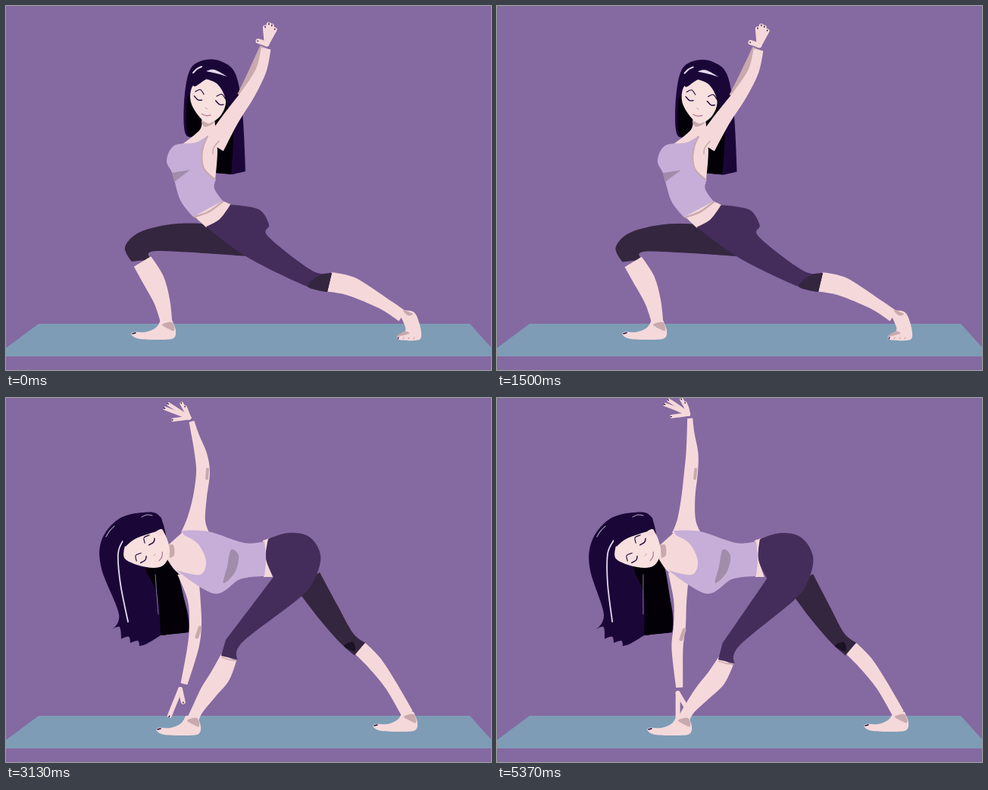
Write an HTML page that moves like this. It is 640 by 480 pixels and loops after 5.41 s.

```html
<!DOCTYPE html>
<html lang="en">
<head>
<meta charset="utf-8">
<title>Yoga flow</title>
<style>
html, body { margin: 0; width: 100%; height: 100%; overflow: hidden; background: #8569a1; }
svg { display: block; width: 640px; height: 480px; }
</style>
</head>
<body>
<svg viewBox="0 0 640 480">
  <rect width="640" height="480" fill="#8569a1"/>
  <path d="M43 419H612L640 450V462H0V451Z" fill="#7e9cb6"/>
  <g id="lunge"></g>
  <g id="triangle"></g>
</svg>
<script>
const LOOP = 5410, SWITCH = 2500;
const SKIN = '#f5d9da', FACE = '#f8e0df', SHADE = '#c8a9ad', TOP = '#c6aed8', FOLD = '#a18caa',
  PANTS = '#442d5a', DARK = '#34263f', HAIR = '#1b0638', BLACK = '#030007', GLOSS = '#e4daf0';
const poses = {
  lunge: { el: document.getElementById('lunge'), parts: [] },
  triangle: { el: document.getElementById('triangle'), parts: [] }
};
let pose;

const clamp = v => Math.max(0, Math.min(1, v));
function ease(t, start, end) {
  const u = clamp((t - start) / (end - start));
  return u * u * (3 - 2 * u);
}

// Motion rules: an offset that grows with height from y0 to y1, and sums of such offsets.
const still = () => [0, 0];
const shift = (dx, dy) => () => [dx, dy];
const pull = (dx, dy, y0, y1) => y => {
  const w = clamp((y - y0) / (y1 - y0));
  return [dx * w, dy * w];
};
const both = (a, b) => y => a(y).map((v, i) => v + b(y)[i]);

// Points are "x,y" or "x,y,halfWidth"; a trailing * marks a sharp corner.
const parse = text => text.trim().split(/\s+/).map(s => {
  const [x, y, w] = s.replace('*', '').split(',').map(Number);
  return { x, y, w, sharp: s.endsWith('*') };
});

function curve(pts, closed) {
  const n = pts.length;
  const at = i => closed ? pts[(i + n) % n] : pts[Math.max(0, Math.min(n - 1, i))];
  const tangent = i => at(i).sharp ? [0, 0]
    : [(at(i + 1).x - at(i - 1).x) / 6, (at(i + 1).y - at(i - 1).y) / 6];
  let d = `M${pts[0].x} ${pts[0].y}`;
  for (let i = 0; i < (closed ? n : n - 1); i++) {
    const p = at(i), q = at(i + 1), s = tangent(i), e = tangent(i + 1);
    d += `C${[p.x + s[0], p.y + s[1], q.x - e[0], q.y - e[1], q.x, q.y].map(v => v.toFixed(2)).join(' ')}`;
  }
  return d + (closed ? 'Z' : '');
}

// Outline of a tapered limb around its joints.
function outline(joints) {
  const sides = [[], []], last = joints.length - 1;
  joints.forEach((p, i) => {
    const a = joints[Math.max(0, i - 1)], b = joints[Math.min(last, i + 1)];
    const length = Math.hypot(b.x - a.x, b.y - a.y);
    const nx = (a.y - b.y) / length * p.w, ny = (b.x - a.x) / length * p.w;
    const sharp = i === 0 || i === last;
    sides[0].push({ x: p.x + nx, y: p.y + ny, sharp });
    sides[1].unshift({ x: p.x - nx, y: p.y - ny, sharp });
  });
  return curve(sides.flat(), true);
}

function add(shape, move, color, points, width) {
  const el = document.createElementNS('http://www.w3.org/2000/svg', 'path');
  el.setAttribute('fill', width ? 'none' : color);
  if (width) {
    el.setAttribute('stroke', color);
    el.setAttribute('stroke-width', width);
    el.setAttribute('stroke-linecap', 'round');
  }
  pose.el.append(el);
  pose.parts.push({ el, shape, move, points });
}
const blob = (move, color, text) => add(p => curve(p, true), move, color, parse(text));
const limb = (move, color, text) => add(outline, move, color, parse(text));
const line = (move, color, text, width) => add(p => curve(p, false), move, color, parse(text), width);

// Fingers run from the palm to each tip and end in a dark nail.
function hand(move, palm, tips, width) {
  const [cx, cy] = palm;
  for (const [x, y] of tips) {
    const along = u => `${x + (cx - x) * u},${y + (cy - y) * u}`;
    line(move, SKIN, `${along(.06)} ${along(.5)} ${cx},${cy}`, width);
    line(move, HAIR, `${along(0)} ${along(.05)}`, 1.3);
  }
}
function foot(x, y) {
  const place = text => parse(text).map(p => `${p.x + x},${p.y + y}${p.sharp ? '*' : ''}`).join(' ');
  blob(still, SKIN, place('-20,-25* -26,-15 -40,-9 -56,-9 -58,-5 -48,0 -20,1 -3,-1 0,-11 -5,-25*'));
  blob(still, SHADE, place('-18,-19 -5,-22 -2,-11 -9,-13'));
  line(still, HAIR, place('-57,-7 -53,-8'), 1.5);
}
// Closed eyes, brows, nose and mouth, turned as one around the point between the eyes.
function features(move, x, y, degrees, spread) {
  const c = Math.cos(degrees * Math.PI / 180), s = Math.sin(degrees * Math.PI / 180);
  const place = (text, ox = 0) => parse(text)
    .map(p => [p.x + ox, p.y]).map(([u, v]) => `${x + u * c - v * s},${y + u * s + v * c}`).join(' ');
  for (const ox of [-spread, spread]) {
    line(move, HAIR, place('-6,-2 0,2 5,1', ox), 1.4);
    line(move, HAIR, place('-6,-8 0,-12 6,-7', ox), 1.1);
  }
  line(move, '#b98d9d', place('-3,10 0,11'), .9);
  line(move, '#b46f91', place('-6,19 0,20 6,18'), 1.2);
}

function buildLunge() {
  pose = poses.lunge;
  const head = shift(2, 2), arm = pull(6.5, 6, 190, 65), body = pull(-1, 2, 165, 260);
  const frontLeg = pull(-1.6, 1.9, 415, 300), hips = pull(-1.4, 2, 345, 290);

  blob(head, HAIR, '263,71 244,82 236,115 235,160 243,173 266,164 276,220* 299,222* 316,218* 312,140 303,90 284,73');
  blob(head, BLACK, '288,120 300,150 297,222* 276,220* 264,160');
  blob(head, BLACK, '241,118 239,165 251,171 258,150');
  limb(arm, SHADE, '340,54,5 327,85,6 309,118,4');
  blob(body, SKIN, '258,148* 256,163 233,182* 240,205 276,230* 279,190 275,149*');
  blob(body, SHADE, '258,151 268,155 276,149 272,156 262,159');
  limb(arm, SKIN, '343,56,6.5 337,84,7 320,115,9 297,148,11 275,184,14');
  hand(arm, [344, 50], [[342, 27], [347, 23], [351, 25], [355, 30], [332, 46]], 6.5);
  line(arm, SHADE, '281,178 274,187 273,195', 1.5);

  blob(frontLeg, DARK, '280,288* 225,287 177,298 157,318 166,337* 193,334* 199,323 320,330*');
  limb(frontLeg, SKIN, '180,337,13 195,362,14 206,390,10.5 212,418,7.5');
  foot(224, 439);
  limb(hips, SKIN, '427,364,13 456,370,12.5 496,391,8.5 523,409,8');
  blob(still, SKIN, '517,402* 537,403 545,417 548,436 540,441 516,439 527,428 524,416');
  blob(still, SHADE, '524,401 537,406 530,408');
  blob(still, SHADE, '515,436 526,429 532,432');
  for (let x = 517; x < 545; x += 7) line(still, x < 520 ? HAIR : SHADE, `${x},439 ${x + 1},437`, 1.1);
  blob(body, SKIN, '247,276* 284,256* 297,262* 284,282 264,292*');
  blob(hips, PANTS, '264,291* 282,281 296,262* 333,268 347,288 346,304 404,349 430,352* 424,377* 395,369 318,331');
  blob(hips, DARK, '398,370 414,355 430,352* 424,377*');

  blob(body, TOP, '266,171* 250,180 222,184 212,204 220,222 230,256 247,278* 286,257* 275,241 277,229* 259,210 261,187');
  line(body, SHADE, '266,172 259,190 261,214 276,229', 2);
  blob(body, FOLD, '219,220* 243,216* 222,232*');
  line(body, SHADE, '249,278 268,271 286,258', 2.5);

  blob(head, FACE, '258,95* 245,108 245,130 263,153 281,147 290,126 279,103');
  blob(head, HAIR, '251,85 248,106 270,95 288,112 292,137* 299,112 280,84');
  features(head, 268, 125, 12, 14.5);
  line(head, GLOSS, '247,88 252,83 258,80', 2);
  blob(head, GLOSS, '264,86* 275,84 292,93* 278,89');
}

function buildTriangle() {
  pose = poses.triangle;
  const sway = pull(-10, 0, 180, 310), body = shift(1, 0);
  const raised = both(pull(-4, 0, 170, 125), pull(16, -5, 95, 20));
  const reach = both(pull(-9, 3, 230, 280), pull(33, 4, 340, 422));
  const frontLeg = both(pull(8, 5, 170, 330), pull(-8, -5, 350, 415));
  const rearLeg = pull(3, 2, 320, 250);

  let tips = '';
  for (let i = 0; i < 4; i++) {
    const x = 140 + 12 * i, y = 305 + 22 * Math.sqrt(i / 3);
    tips += `${x},${y}* ${x + 10},${y - 3} `;
  }
  blob(sway, HAIR, `204,158 181,151 148,160 126,188 126,225 149,285 ${tips} 204,313* 241,309* 239,280 217,207`);
  blob(sway, BLACK, '184,220 200,260 204,313* 241,309* 238,279 217,207');
  line(sway, GLOSS, '155,187 148,205 151,245 161,295', 1.8);
  line(sway, '#9383ad', '197,233 199,260 201,285', .9);
  line(sway, GLOSS, '132,183 137,175 143,169', 1);

  limb(reach, SKIN, '240,230,14 248,265,8.5 250,297,8 247,328,7.5 235,377,4.5');
  hand(reach, [230, 384], [[215, 421], [234, 402]], 6);
  line(reach, SHADE, '256,303 252,315', 5);

  limb(rearLeg, SKIN, '467,330,10 486,349,10 508,379,8 530,417,8');
  foot(543, 439);
  limb(rearLeg, DARK, '398,240,19 425,282,15 450,317,10.5 467,331,11');
  blob(rearLeg, '#1c1225', '446,327 458,322 460,334');
  limb(frontLeg, SKIN, '294,342,11 283,366,13 267,388,11 252,412,7.5 246,426,8');
  foot(257, 444);
  blob(body, SKIN, '339,188* 347,185* 344,210 352,236* 340,236*');
  blob(frontLeg, PANTS, '346,186* 372,178 400,183 415,207 408,237 388,263 312,322 306,345* 284,340* 290,319* 353,236* 343,212');
  line(frontLeg, SHADE, '285,342 294,345 304,346', 1.5);

  blob(body, SKIN, '214,194* 234,176* 264,174 264,225 248,239 226,230 213,213*');
  blob(body, SHADE, '214,194* 221,194 222,207 216,211*');
  limb(raised, SKIN, '250,178,19 251,160,12 256,130,9 260,98,9 257,74,8 250,50,5 245,31,3.5');
  hand(raised, [242, 26], [[208, 13], [213, 7], [231, 6], [236, 11], [219, 29]], 4.8);
  line(raised, SHADE, '266,94 265,106', 4);
  blob(body, TOP, '232,175* 267,176 314,191 341,189* 343,212 341,235* 309,239 275,258 225,227* 256,233 264,215 253,192 235,181*');
  blob(body, FOLD, '297,200 307,208 302,230 287,244 292,222');

  blob(still, FACE, '158,192* 157,212 185,223 207,221 216,201 205,174 180,180');
  blob(still, HAIR, '204,157 205,174* 172,185 158,196* 154,178 180,152');
  line(still, SKIN, '202,178 204,177', 8);
  features(still, 187.5, 201, -65, 13);
  line(still, GLOSS, '179,157 186,154 193,155', .8);
}

function draw(t) {
  const first = t < SWITCH;
  poses.lunge.el.style.display = first ? '' : 'none';
  poses.triangle.el.style.display = first ? 'none' : '';
  const k = first
    ? ease(t, 100, 800) - ease(t, 1150, 1700)
    : 1 - ease(t, SWITCH, 2860) + ease(t, 3990, 4400);
  for (const { el, shape, move, points } of poses[first ? 'lunge' : 'triangle'].parts) {
    el.setAttribute('d', shape(points.map(p => {
      const [dx, dy] = move(p.y);
      return { ...p, x: p.x + dx * k, y: p.y + dy * k };
    })));
  }
}

buildLunge();
buildTriangle();
const begin = performance.now();
function tick() {
  draw((performance.now() - begin) % LOOP);
  requestAnimationFrame(tick);
}
tick();
</script>
</body>
</html>
```
